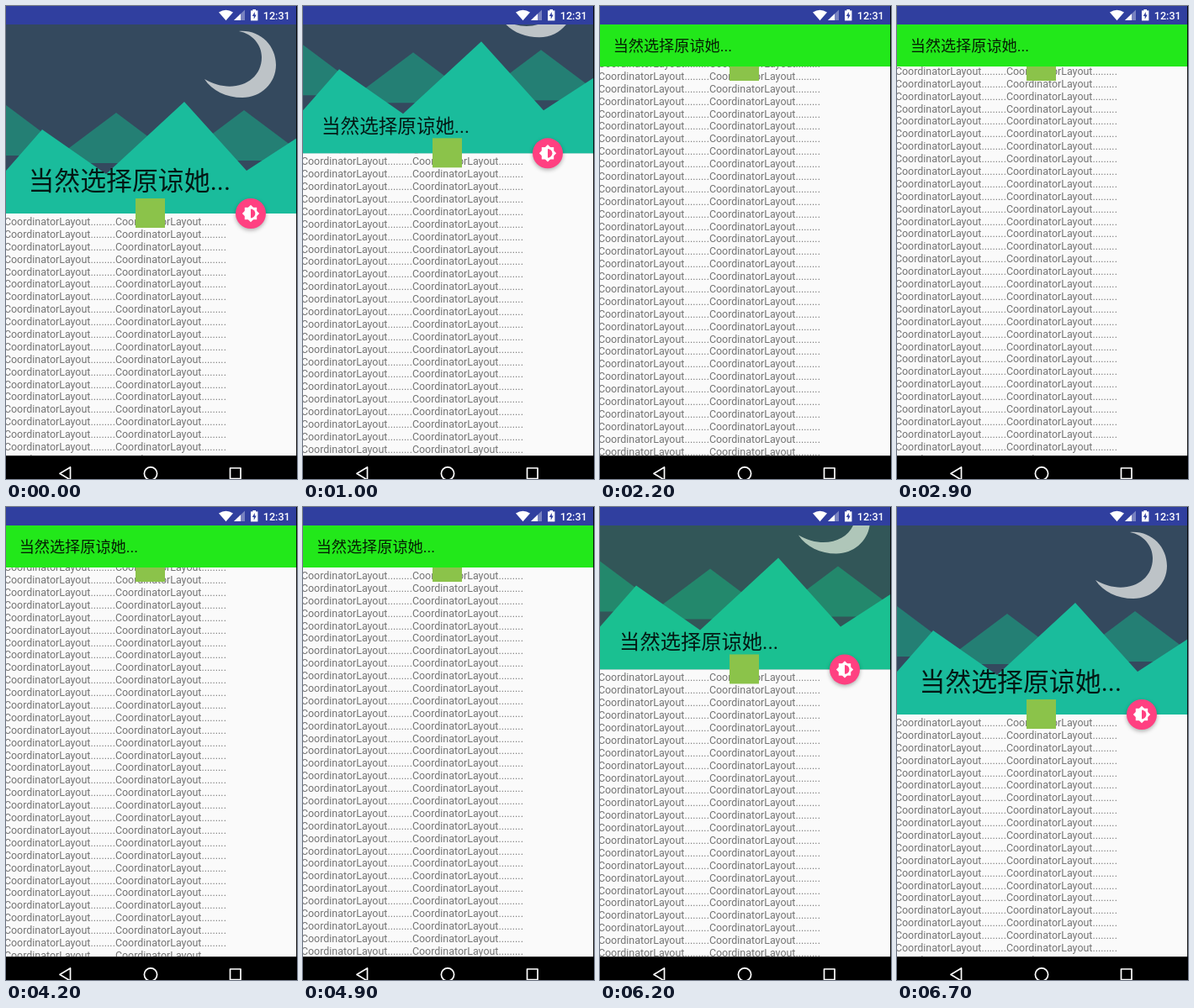
These frames come from a looping animation (346x563 px, 8 s). An HTML page with a canvas:

```html
<!DOCTYPE html>
<html lang="zh-CN">
<head>
<meta charset="utf-8">
<title>Collapsing header</title>
<style>
html, body { margin: 0; width: 100%; height: 100%; overflow: hidden; background: #000; }
canvas { display: block; width: 346px; height: 563px; }
</style>
</head>
<body>
<canvas id="stage"></canvas>
<script>
const W = 346, H = 563, LOOP = 8000, STEP = 100;
const BAR = 22, OPEN = 247, RANGE = 175, NAV = 535.4, RIGHT = 345.1;
const PITCH = 14.89, ROW = 'CoordinatorLayout.........'.repeat(2);
const SCRIM_IN = 1280, SCRIM_OUT = 5820, SCRIM_TIME = 600, BUTTON_TIME = 200;

const canvas = document.getElementById('stage');
const ratio = window.devicePixelRatio || 1;
canvas.width = W * ratio;
canvas.height = H * ratio;
const c = canvas.getContext('2d');

const MOON = new Path2D('M277 30C302 28 321 47 321 70C321 92 303 109 281 109' +
  'C262 109 245 101 236 87C268 106 304 92 304 61C304 46 293 33 277 30Z');

const clamp = v => Math.max(0, Math.min(1, v));
const mix = (a, b, k) => a + (b - a) * k;
const part = (t, from, time) => clamp((t - from) / time);
const smooth = p => p * p * (3 - 2 * p);
const settle = p => 1 - (1 - p) ** 1.3;

// How far the header is collapsed, 0 to 1
const collapse = t => settle(part(t, 700, 900)) - smooth(part(t, 5340, 1360));

// Two flings up the list, then one back to its top
const scroll = t => 72 * smooth(part(t, 1700, 700)) + 79 * smooth(part(t, 2600, 500)) -
  151 * smooth(part(t, 3600, 1300));

function bezier(x1, y1, x2, y2, x) {
  const at = (a, b, s) => 3 * (1 - s) * (1 - s) * s * a + 3 * (1 - s) * s * s * b + s * s * s;
  let lo = 0, hi = 1;
  for (let i = 0; i < 24; i++) {
    const s = (lo + hi) / 2;
    if (at(x1, x2, s) < x) lo = s; else hi = s;
  }
  return at(y1, y2, lo);
}

const scrim = t => bezier(0.4, 0, 1, 1, part(t, SCRIM_IN, SCRIM_TIME)) -
  bezier(0, 0, 0.2, 1, part(t, SCRIM_OUT, SCRIM_TIME));

function rect(color, x, y, w, h) {
  c.fillStyle = color;
  c.fillRect(x, y, w, h);
}

function poly(color, ...p) {
  c.fillStyle = color;
  c.beginPath();
  for (let i = 0; i < p.length; i += 2) c.lineTo(p[i], p[i + 1]);
  c.closePath();
  c.fill();
}

function disc(color, r, from, to) {
  c.fillStyle = color;
  c.beginPath();
  c.arc(0, 0, r, from, to);
  c.fill();
}

function clipped(x, y, w, h, draw) {
  c.save();
  c.beginPath();
  c.rect(x, y, w, h);
  c.clip();
  draw();
  c.restore();
}

function drawList(bottom, offset) {
  rect('#fafafa', 0, bottom, W, NAV - bottom);
  clipped(0, bottom, W, NAV - bottom, () => {
    c.fillStyle = '#747474';
    c.font = '12.45px Roboto, sans-serif';
    for (let y = bottom + 14 - offset % PITCH; y < NAV + PITCH; y += PITCH) c.fillText(ROW, -2.1, y);
  });
}

function drawScene(shift) {
  const hill = (x, y) => poly('#247f74', x, y, x - 80, y + 60, x + 80, y + 60);
  c.save();
  c.translate(0, -shift);
  rect('#34495e', 0, BAR, W, OPEN - BAR);
  c.fillStyle = '#bdc3c7';
  c.fill(MOON);
  hill(0, 118);
  hill(131, 127);
  hill(283, 124);
  poly('#1abc9c', 0, 196, 43, 147, 119, 200, 212, 114, 286, 196, W, 157, W, OPEN, 0, OPEN);
  c.restore();
}

function drawTitle(k) {
  const size = mix(30.9, 18.15, 1 - (1 - k) * (1 - k));
  c.fillStyle = 'rgba(0,0,0,.87)';
  c.font = size + 'px Roboto, "Noto Sans CJK SC", "Noto Sans CJK", sans-serif';
  c.fillText('当然选择原谅她...', mix(26.4, 15.7, k), mix(219.4, 53.6, k));
}

function drawHeader(bottom, k, alpha) {
  clipped(0, BAR, W, bottom - BAR, () => {
    drawScene(k * RANGE);
    c.globalAlpha = alpha;
    rect('#22e81a', 0, BAR, W, bottom - BAR);
    c.globalAlpha = 1;
    drawTitle(k);
  });
}

function drawShadow(bottom) {
  const g = c.createLinearGradient(0, bottom, 0, bottom + 4);
  g.addColorStop(0, 'rgba(0,0,0,.16)');
  g.addColorStop(1, 'rgba(0,0,0,0)');
  rect(g, 0, bottom, W, 4);
}

function drawButton(y, k) {
  if (k <= 0) return;
  const pink = '#ff4081';
  c.save();
  c.translate(291, y);
  c.scale(k, k);
  c.globalAlpha = k;
  c.shadowColor = 'rgba(0,0,0,.3)';
  c.shadowBlur = 5 * ratio;
  c.shadowOffsetY = 2 * ratio;
  disc(pink, 18, 0, Math.PI * 2);
  c.shadowColor = 'transparent';
  for (let i = 0; i < 2; i++) {
    rect('#fff', -7.2, -7.2, 14.4, 14.4);
    c.rotate(Math.PI / 4);
  }
  c.rotate(-Math.PI / 2);
  disc(pink, 5.4, -Math.PI / 2, Math.PI / 2);
  c.restore();
}

function drawStatus() {
  const blue = '#303f9f';
  rect(blue, 0, 0, W, BAR);
  c.fillStyle = '#fff';
  c.beginPath();
  c.moveTo(261.5, 17.3);
  c.lineTo(253, 7.6);
  c.quadraticCurveTo(261.5, 1.8, 270, 7.6);
  c.fill();
  poly('rgba(255,255,255,.35)', 271, 17, 284, 17, 284, 4.5);
  poly('#fff', 271, 17, 279, 17, 279, 9.3);
  rect('#fff', 291, 5.4, 8.4, 12);
  rect('#fff', 293.4, 4, 3.6, 2);
  poly(blue, 295.8, 7, 292.8, 12, 294.7, 12, 294.7, 15.8, 297.7, 10.6, 295.8, 10.6);
  c.fillStyle = '#fff';
  c.font = '500 12.6px Roboto, sans-serif';
  c.fillText('12:31', 305.8, 16);
}

function drawNav() {
  rect('#000', 0, NAV, W, H - NAV);
  c.strokeStyle = '#fff';
  c.lineWidth = 1.7;
  c.lineJoin = 'round';
  c.beginPath();
  c.moveTo(64, 556.5);
  c.lineTo(76.5, 549);
  c.lineTo(76.5, 564);
  c.closePath();
  c.moveTo(179.6, 556.5);
  c.arc(172, 556.5, 7.6, 0, Math.PI * 2);
  c.rect(266.5, 550, 12.5, 12.5);
  c.stroke();
}

function draw(t) {
  c.setTransform(ratio, 0, 0, ratio, 0, 0);
  const k = collapse(t), bottom = OPEN - k * RANGE, alpha = scrim(t);
  const raised = t >= SCRIM_IN && t < SCRIM_OUT;
  const badge = () => rect('#8bc34a', 154, bottom - 18, 35, 35);

  drawList(bottom, scroll(t));
  if (raised) badge();
  if (k === 1 && alpha === 1) drawShadow(bottom);
  drawHeader(bottom, k, alpha);
  if (!raised) badge();
  drawButton(bottom, 1 - part(t, SCRIM_IN, BUTTON_TIME) + part(t, SCRIM_OUT, BUTTON_TIME));
  drawStatus();
  drawNav();
  rect('#000', RIGHT, 0, W - RIGHT, H);
}

const start = performance.now();
function tick() {
  const t = (performance.now() - start) % LOOP;
  draw(Math.floor(t / STEP) * STEP);
  requestAnimationFrame(tick);
}
tick();
</script>
</body>
</html>
```
